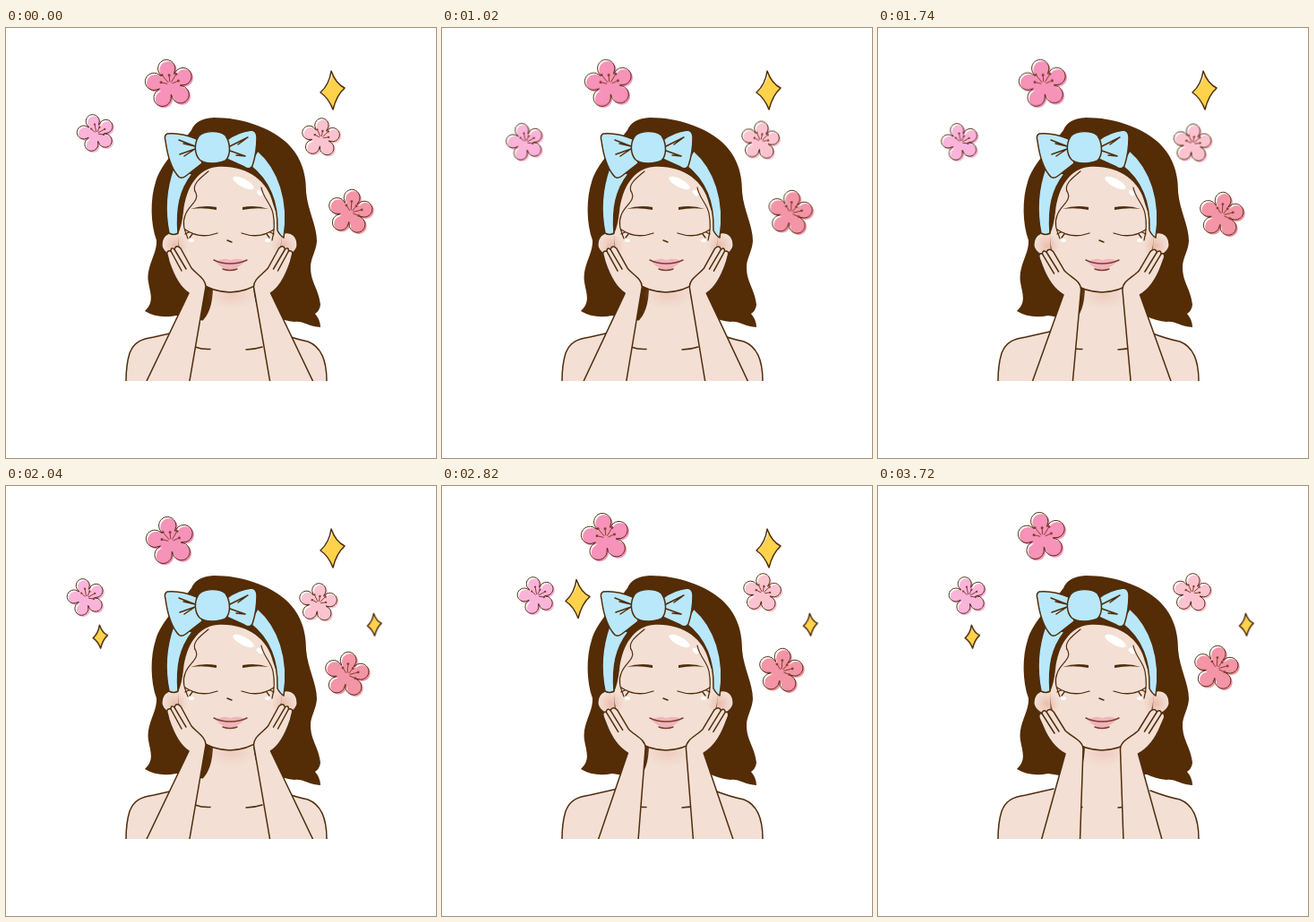
Recreate the animation shown at these times as an HTML page. Size 480 by 480 pixels, loop 3750 ms.

```html
<!DOCTYPE html>
<html lang="en">
<head>
<meta charset="utf-8">
<title>Spring skin care</title>
<style>
html, body { margin: 0; width: 100%; height: 100%; overflow: hidden; background: #fff; }
svg { display: block; width: 100vw; height: 100vh; }
.line { fill: none; stroke: #4f2d0c; stroke-width: 1.5; stroke-linecap: round; stroke-linejoin: round; }
.skin { fill: #f3dfd4; }
.blue { fill: #b9e8fa; }
.edge { stroke: #4f2d0c; stroke-width: 1.5; stroke-linejoin: round; }

.arm, .fingers { animation: 3750ms cubic-bezier(.37,0,.63,1) infinite; }
.arm { animation-name: arm; }
.fingers { animation-name: fingers; }
@keyframes arm {
  0%, 25.2%, 54.8%, 84.4% {
    d: path("M135 440 L204 296 C193 289 187 276 182 261 L180 253 Q179 248 184 249 Q184 244 188 247 Q190 241 195 246 L207 268 C214 276 223 280 223 289 L197 440 Z");
  }
  10.4%, 40%, 69.6%, 99.2%, 100% {
    d: path("M170 440 L209 299 C198 293 190 283 184 268 L180 259 Q179 253 183 254 Q184 249 188 252 Q191 247 196 252 L209 273 C216 280 229 284 229 294 L224 440 Z");
  }
}
@keyframes fingers {
  0%, 25.2%, 54.8%, 84.4% { d: path("M184 249 L196 271 M188 247 L201 269"); }
  10.4%, 40%, 69.6%, 99.2%, 100% { d: path("M183 254 L197 276 M188 252 L202 274"); }
}

.flower { animation: 3750ms ease-in-out infinite; }
#f1 { animation-name: drift1; }
#f2 { animation-name: drift2; }
#f3 { animation-name: drift3; }
#f4 { animation-name: drift4; }
@keyframes drift1 {
  0% { transform: translate(183px, 63px); }
  16% { transform: translate(188px, 62px); }
  38.4% { transform: translate(186px, 63.5px); }
  54.4% { transform: translate(184px, 62px); }
  75.2% { transform: translate(183px, 58px); }
  88.8%, 100% { transform: translate(184px, 57px); }
}
@keyframes drift2 {
  0% { transform: translate(101px, 118px); }
  16% { transform: translate(107px, 122px); }
  28.8% { transform: translate(93px, 128px); }
  38.4% { transform: translate(95px, 131px); }
  54.4% { transform: translate(90px, 125px); }
  58% { transform: translate(87px, 125px); }
  75.2% { transform: translate(106px, 123px); }
  88.8% { transform: translate(100px, 124px); }
  99.2%, 100% { transform: translate(101px, 123px); }
}
@keyframes drift3 {
  0% { transform: translate(352px, 123px); }
  16% { transform: translate(358px, 125px); }
  38.4% { transform: translate(354px, 128px); }
  54.4% { transform: translate(349px, 131px); }
  75.2% { transform: translate(358px, 120px); }
  88.8% { transform: translate(354px, 124px); }
  99.2%, 100% { transform: translate(351px, 120px); }
}
@keyframes drift4 {
  0% { transform: translate(385px, 206px); }
  16% { transform: translate(388px, 206px); }
  22% { transform: translate(390px, 207px); }
  38.4% { transform: translate(387px, 207px); }
  54.4% { transform: translate(381px, 211px); }
  75.2% { transform: translate(379px, 207px); }
  88.8%, 100% { transform: translate(378px, 204px); }
}

.star { animation: 3750ms step-end infinite; }
#s1 { animation-name: blink1; }
#s2 { animation-name: blink2; }
#s3 { animation-name: blink3; }
#s4 { animation-name: blink4; }
@keyframes blink1 {
  0%, 20.8%, 36.8%, 52.8%, 68.8%, 84.8% { opacity: 1; }
  17.6%, 33.6%, 49.6%, 65.6%, 81.6%, 97.6%, 100% { opacity: 0; }
}
@keyframes blink2 {
  15.2%, 31.2%, 47.2%, 63.2%, 79.2%, 95.2% { opacity: 1; }
  0%, 26.4%, 42.4%, 58.4%, 74.4%, 90.4%, 100% { opacity: 0; }
}
@keyframes blink3 {
  32%, 68% { opacity: 1; }
  0%, 46.4%, 82.4%, 100% { opacity: 0; }
}
@keyframes blink4 {
  34.4%, 50.4%, 66.4%, 82.4%, 98.4% { opacity: 1; }
  0%, 44%, 60%, 76%, 92%, 100% { opacity: 0; }
}
</style>
</head>
<body>
<svg id="stage" viewBox="0 0 480 480">
  <defs>
    <clipPath id="crop"><path d="M0 0H480V394H0Z"/></clipPath>
    <radialGradient id="blush">
      <stop offset="0" stop-color="#e5ad99" stop-opacity=".7"/>
      <stop offset="1" stop-color="#e9b7a5" stop-opacity="0"/>
    </radialGradient>
    <g id="star">
      <path d="M1 -20 Q5 -6 14 -2 Q5 6 1 21 Q-3 9 -12 2 Q-3 -6 1 -20Z" fill="#fed34b"/>
      <path class="line" d="M-1 -22 Q4 -8 14 -3 Q5 5 1 21 Q-4 8 -13 2 Q-3 -7 -1 -22Z" vector-effect="non-scaling-stroke"/>
    </g>
  </defs>

  <g clip-path="url(#crop)">
    <path fill="#542c06" d="M207 114 Q212 101 232 100 C264 100 293 111 311 126 C328 141 335 159 335 183 C337 205 347 220 347 238 C346 250 340 257 340 267 C340 284 349 291 351 309 Q350 316 345 319 Q351 326 351 334 C337 333 330 326 322 328 Q311 327 300 322 L225 328 Q205 323 190 321 Q170 325 155 316 C166 306 161 296 159 284 C156 266 169 252 168 237 C161 218 161 190 167 172 C173 152 187 140 207 114Z"/>

    <path class="skin" d="M134 400 Q133 376 138 363 C143 350 152 347 165 345 L196 339 L217 329 Q231 318 231 288 H276 Q278 324 304 340 Q322 348 337 350 C350 355 358 368 358 400Z"/>
    <path class="line" d="M134 394 Q134 376 138 363 C143 350 152 347 165 345 L196 338 M304 340 Q322 347 337 350 C350 355 358 368 358 394 M211 356 Q219 359 228 358.500 M268 359 Q277 359 286 356"/>
    <ellipse cx="252" cy="298" rx="28" ry="15" fill="url(#blush)" opacity=".55"/>

    <g class="skin edge">
      <path d="M193 230 C179 225 173 234 174 244 Q177 254 193 256Z"/>
      <path d="M307 230 C320 225 326 234 325 244 Q322 254 306 256Z"/>
    </g>
    <path class="skin" d="M236 155 C214 157 201 178 198 205 Q196 222 192 230 C192 264 216 294 250 295 C284 294 307 264 308 231 Q303 210 298 196 C292 170 268 153 236 155Z"/>
    <path class="line" d="M195 255 C203 279 223 294 250 295 C277 294 296 279 304 255"/>
    <circle cx="189" cy="243" r="14" fill="url(#blush)"/>
    <circle cx="310" cy="243" r="14" fill="url(#blush)"/>

    <g class="blue edge">
      <path d="M187 156 C178 181 177 205 182 229 Q187 232 192 229 C190 201 194 181 208 163Z"/>
      <path d="M281 137 C304 157 317 193 310 234 Q306 232 303 226 C304 194 294 170 272 153Z"/>
      <path d="M213 124 C201 119 189 117 180 118 Q176 120 178 126 C180 141 184 155 191 164 Q195 170 201 165 L219 151Z"/>
      <path d="M247 125 Q258 116 274 114 Q280 115 280 122 C280 134 278 145 275 154 Q272 159 266 155 L246 146Z"/>
      <path d="M215 121 C221 114 238 114 245 120 C251 129 251 142 245 148 C237 152 222 152 216 147 C210 140 210 129 215 121Z"/>
    </g>
    <path class="line" d="M193 125 L211 132 L198 129 M194 141 L211 135 L199 143 M250 132 L270 122 L259 130 M250 137 L267 143 L257 142"/>

    <path class="line" d="M226 160 C216 168 206 176 212 184 C216 193 204 198 200 209 C196 219 200 227 203 235" style="stroke-width:1.2"/>
    <path class="line" d="M285 178 C287 190 296 196 298 207 Q301 222 297 237" style="stroke-width:1.2"/>
    <g fill="#4f2d0c">
      <path d="M206 202 Q220 197 235 200 L235 203 Q220 200 206 202Z"/>
      <path d="M293 202 Q279 197 264 200 L264 203 Q279 200 293 202Z"/>
    </g>
    <path class="line" d="M200 225 Q216 236 236 229 M263 229 Q283 236 299 225 M204 228 L200 230 M208 230 L205 234 M295 228 L299 230 M291 230 L294 234" style="stroke-width:1.3"/>
    <path class="line" d="M247 237 L252 239"/>
    <path fill="#f0b4bc" d="M234 261 Q242 257 247 258 Q250 260 254 258 Q261 257 267 260 Q259 269 250 270 Q241 269 234 261Z"/>
    <path class="line" d="M232 259 Q240 263 250 263 Q261 263 269 259 M242 269 Q250 272 258 269" style="stroke:#7c3f2c;stroke-width:1.4"/>
    <g fill="#fff">
      <ellipse cx="265" cy="173" rx="13" ry="4.500" transform="rotate(28 265 173)"/>
      <ellipse cx="283" cy="184" rx="4" ry="2.500" transform="rotate(50 283 184)"/>
      <ellipse cx="207" cy="237" rx="3" ry="2"/>
      <ellipse cx="292" cy="237" rx="3" ry="2"/>
    </g>

    <g><path class="skin edge arm"/><path class="line fingers"/></g>
    <g transform="matrix(-1 0 0 1 499.500 0)"><path class="skin edge arm"/><path class="line fingers"/></g>
  </g>

  <g class="star" id="s1"><use href="#star" transform="translate(364 70)"/></g>
  <g class="star" id="s2"><use href="#star" transform="translate(105 168.500) scale(.6)"/></g>
  <g class="star" id="s3"><use href="#star" transform="translate(151 126.500)"/></g>
  <g class="star" id="s4"><use href="#star" transform="translate(411 155) scale(.58)"/></g>
</svg>
<script>
const stage = document.getElementById('stage');
const rad = Math.PI / 180;
const polar = (r, deg) => [r * Math.cos(deg * rad), r * Math.sin(deg * rad)].map(n => n.toFixed(2)).join(' ');

// Five rounded lobes; turn is the direction of the first petal.
function petals(size, turn) {
  const pts = [];
  for (let a = 0; a < 360; a += 4) {
    const lobe = Math.abs(Math.cos(2.5 * a * rad)) ** 0.55;
    pts.push(polar(size * (0.45 + 0.55 * lobe), a + turn));
  }
  return 'M' + pts.join('L') + 'Z';
}

function flower(id, size, turn, color, fan) {
  const outline = petals(size, turn);
  let lines = '', dots = '';
  for (let i = -2; i <= 2; i++) {
    const tip = polar(size * (i % 2 ? 0.5 : 0.38), fan + i * 36);
    const [x, y] = tip.split(' ');
    lines += `M${polar(size * 0.12, fan + i * 36)}L${tip}`;
    dots += `<circle cx="${x}" cy="${y}" r="${size * 0.055}"/>`;
  }
  return `<g class="flower" id="${id}">
    <path d="${outline}" fill="${color}" transform="translate(1 1)"/>
    <path class="line" d="${outline}" transform="translate(-.8 -.8)" style="stroke-width:1"/>
    <path class="line" d="${lines}" style="stroke:#85402f;stroke-width:1"/>
    <g fill="#85402f">${dots}</g></g>`;
}

stage.insertAdjacentHTML('beforeend',
  flower('f1', 27, -100, '#f792b9', -95) +
  flower('f2', 21, -105, '#fab4da', -65) +
  flower('f3', 21.5, -85, '#fbc3d0', -80) +
  flower('f4', 25, -83, '#f494a7', -50));
</script>
</body>
</html>
```
